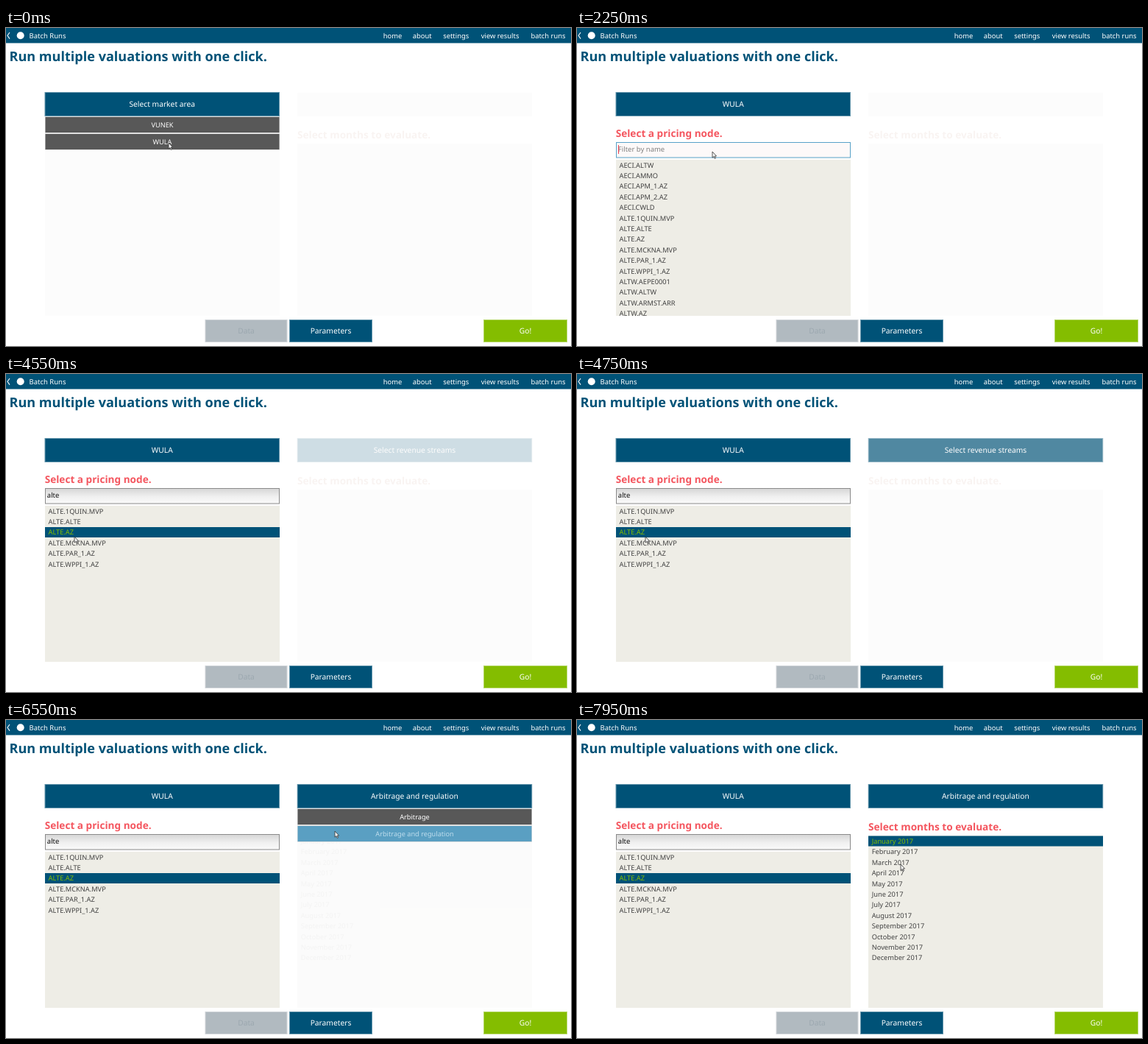
Recreate the animation shown at these times as an HTML page. Size 768 px wide and 432 px high, loop 8 s.

```html
<!DOCTYPE html>
<html lang="en">
<head>
<meta charset="utf-8">
<title>Batch Runs</title>
<style>
html, body { margin: 0; width: 100%; height: 100%; overflow: hidden; background: #fff; }
svg { display: block; width: 768px; height: 432px; }
text { font-family: "Noto Sans", "Open Sans", sans-serif; text-rendering: geometricPrecision; white-space: pre; }
</style>
</head>
<body>
<svg id="stage" viewBox="0 0 768 432" xmlns="http://www.w3.org/2000/svg">
  <defs>
    <linearGradient id="field" x1="0" y1="0" x2="0" y2="1">
      <stop offset="0" stop-color="#d6d6d6"/>
      <stop offset=".55" stop-color="#f0f0f0"/>
      <stop offset="1" stop-color="#fafafa"/>
    </linearGradient>
    <clipPath id="listClip"><rect x="53" y="179" width="319" height="212"/></clipPath>
  </defs>
</svg>
<script>
const LOOP = 8000, ROW = 14.4;
const NAVY = '#005277', RED = '#f4565f', GREEN = '#84bd00', INK = '#424242', LIST = '#eeede6';
const AREAS = ['VUNEK', 'WULA'];
const STREAMS = ['Arbitrage', 'Arbitrage and regulation'];
const NODES = ('AECI.ALTW AECI.AMMO AECI.APM_1.AZ AECI.APM_2.AZ AECI.CWLD ALTE.1QUIN.MVP ALTE.ALTE ' +
  'ALTE.AZ ALTE.MCKNA.MVP ALTE.PAR_1.AZ ALTE.WPPI_1.AZ ALTW.AEPE0001 ALTW.ALTW ALTW.ARMST.ARR ALTW.AZ ' +
  'ALTW.MVP ALTW.PAR_1.AZ ALTW.PAR_2.AZ ALTW.WPPI_1.AZ ALTW.WPPI_2.AZ').split(' ');
const MONTHS = 'January February March April May June July August September October November December'
  .split(' ').map(m => m + ' 2017');

// time, x, y of the pointer tip
const PATH = [
  [0, 221, 156], [250, 221, 156], [800, 193, 179], [900, 193, 179], [1050, 184, 168],
  [4000, 184, 168], [4350, 93, 221], [4850, 93, 221], [5300, 432, 103], [5600, 432, 103],
  [6100, 447, 151], [7100, 447, 151], [7400, 445, 160], [7650, 445, 160], [7900, 440, 196]
];
const TYPED = [[2650, 'a'], [3050, 'al'], [3250, 'alt'], [3450, 'alte']];
const CARET = [[1200, 1700], [2200, 4050]];

const stage = document.getElementById('stage');

function add(parent, tag, attrs, content) {
  const el = document.createElementNS('http://www.w3.org/2000/svg', tag);
  for (const k in attrs) el.setAttribute(k, attrs[k]);
  if (content) el.textContent = content;
  parent.appendChild(el);
  return el;
}
const group = (parent = stage, attrs = {}) => add(parent, 'g', attrs);
const rect = (p, x, y, width, height, fill) => add(p, 'rect', { x, y, width, height, fill });
const label = (p, str, x, y, size, fill, more) =>
  add(p, 'text', { x, y, 'font-size': size, fill, ...more }, str);
const MID = { 'text-anchor': 'middle' }, BOLD = { 'font-weight': 700 };

// a flat button with a soft half-tone rim
function button(p, x, y, w, h, str, fill, ink = '#fff') {
  const rim = rect(p, x, y, w, h, fill);
  rim.setAttribute('opacity', .6);
  rect(p, x + 1, y + 1, w - 2, h - 2, fill);
  return label(p, str, x + w / 2, y + h / 2 + 3.9, 10.25, ink, MID);
}

function dropdown(x, items) {
  const g = group();
  rect(g, x, 120, 319, 46, '#e0e0e0');
  const opts = items.map((str, i) => {
    const y = 121 + i * 23;
    const box = rect(g, x + .5, y, 318, 21, '#585858');
    const ink = label(g, str, x + 159.5, y + 14.3, 9.2, '#fff', MID);
    return { box, ink };
  });
  return { g, opts };
}

function rows(p, x, top, names) {
  return names.map((str, i) => label(p, str, x, top + i * ROW + 10.6, 9.25, INK));
}

// top bar and heading
rect(stage, 0, 0, 768, 20.5, NAVY);
add(stage, 'path', { d: 'M5 6 2 10.3 5 14.6', fill: 'none', stroke: '#fff', 'stroke-width': 1.1 });
add(stage, 'circle', { cx: 19.7, cy: 10.3, r: 5, fill: '#fff' });
label(stage, 'Batch Runs', 31.5, 14, 9.5, '#fff');
[['home', 525.5], ['about', 565.7], ['settings', 611.7], ['view results', 671.6], ['batch runs', 737]]
  .forEach(([str, x]) => label(stage, str, x, 14, 9.4, '#fff', MID));
label(stage, 'Run multiple valuations with one click.', 4.5, 45.2, 18.07, NAVY, BOLD);

// pale traces of the hidden panels
rect(stage, 53, 166, 319, 225, '#fcfcfc');
rect(stage, 396, 88, 319, 32, '#fcfcfc');
rect(stage, 396, 157, 319, 234, '#fcfcfc');
const trace = label(stage, 'Select months to evaluate.', 396, 149.7, 13.65, '#f9f4f2', BOLD);

// left side
const areaText = button(stage, 52.5, 87, 319.5, 33, 'Select market area', NAVY);
const left = group();
label(left, 'Select a pricing node.', 52.7, 148.1, 13.6, RED, BOLD);
const field = add(left, 'rect', { x: 53.5, y: 155.5, width: 318, height: 20.5 });
const fieldText = label(left, '', 55.8, 168.2, 9.5, '#111');
const caret = rect(left, 0, 159, 1, 12, '#f04050');
rect(left, 53, 179, 319, 212, LIST);
const nodeList = group(left, { 'clip-path': 'url(#listClip)' });
const nodeMark = rect(nodeList, 53, 208, 319, 14, NAVY);
const nodeRows = rows(nodeList, 57.5, 179, NODES);
const scrollBar = rect(left, 367, 179.5, 5, 3.5, GREEN);

// right side
const streams = group();
const streamText = button(streams, 395.7, 87, 319.5, 33, 'Select revenue streams', NAVY);
const right = group();
label(right, 'Select months to evaluate.', 396, 149.7, 13.65, RED, BOLD);
rect(right, 396, 157, 319, 234, LIST);
const monthMark = rect(right, 396, 157.5, 319, 14, NAVY);
const monthRows = rows(right, 400.7, 157.4, MONTHS);

// bottom buttons
button(stage, 270.5, 396, 112, 31, 'Data', '#b1bac0', '#9ca8b0');
button(stage, 385, 396, 113, 31, 'Parameters', NAVY);
button(stage, 649, 396, 114, 31, 'Go!', GREEN);

const areaMenu = dropdown(53, AREAS);
const streamMenu = dropdown(396, STREAMS);
const pointer = add(stage, 'path', {
  d: 'M0 0V8.2L1.9 6.5 3.2 9.4 4.5 8.8 3.2 6H5.6Z',
  fill: '#f4f4f4', stroke: '#333', 'stroke-width': .8, 'stroke-linejoin': 'round'
});

const show = (el, on) => el.setAttribute('visibility', on ? 'inherit' : 'hidden');
const fade = (el, t, start, ms = 400) =>
  el.setAttribute('opacity', Math.min(1, Math.max(0, (t - start) / ms)));

function press(menu, on) {
  const { box, ink } = menu.opts[1];
  box.setAttribute('fill', on ? '#5a9fc2' : '#585858');
  ink.setAttribute('fill', on ? '#bcdcec' : '#fff');
}

function tip(t) {
  let i = 0;
  while (i < PATH.length - 1 && PATH[i + 1][0] <= t) i++;
  const a = PATH[i], b = PATH[i + 1] || a;
  const u = b === a ? 0 : (t - a[0]) / (b[0] - a[0]);
  const e = u * u * (3 - 2 * u);
  return [a[1] + (b[1] - a[1]) * e, a[2] + (b[2] - a[2]) * e];
}

function filterNodes(typed, picked) {
  let n = 0;
  nodeRows.forEach((el, i) => {
    const on = NODES[i].startsWith(typed.toUpperCase());
    show(el, on);
    if (on) el.setAttribute('y', 189.6 + ROW * n++);
    el.setAttribute('fill', picked && NODES[i] === 'ALTE.AZ' ? GREEN : INK);
  });
  show(nodeMark, picked);
}

function drawField(t, typed) {
  const focus = t >= 1200 && t < 4500;
  field.setAttribute('fill', focus ? '#fdf9f9' : 'url(#field)');
  field.setAttribute('stroke', focus ? '#58a2c8' : '#8a8a8a');
  fieldText.textContent = typed || 'Filter by name';
  fieldText.setAttribute('fill', typed ? '#111' : '#808080');
  const blink = CARET.some(([a, b]) => t >= a && t < b);
  show(caret, blink);
  if (blink) caret.setAttribute('x', 56 + (typed ? fieldText.getComputedTextLength() : 0));
}

function draw(t) {
  const typed = TYPED.reduce((s, [at, str]) => t >= at ? str : s, '');
  areaText.textContent = t < 100 ? 'Select market area' : AREAS[1];
  show(areaMenu.g, t < 150);
  press(areaMenu, t >= 100);
  fade(left, t, 100);
  drawField(t, typed);
  filterNodes(typed, t >= 4500);
  show(scrollBar, t < 1000);

  fade(streams, t, 4480);
  streamText.textContent = t < 6550 ? 'Select revenue streams' : STREAMS[1];
  show(streamMenu.g, t >= 5500 && t < 6600);
  press(streamMenu, t >= 6550);
  fade(right, t, 6535);
  show(trace, t < 6550);
  const month = t >= 7500;
  show(monthMark, month);
  monthRows[0].setAttribute('fill', month ? GREEN : INK);

  pointer.setAttribute('transform', `translate(${tip(t)})`);
}

const start = performance.now();
function tick(now) {
  draw(Math.max(0, now - start) % LOOP);
  requestAnimationFrame(tick);
}
draw(0);
requestAnimationFrame(tick);
</script>
</body>
</html>
```
